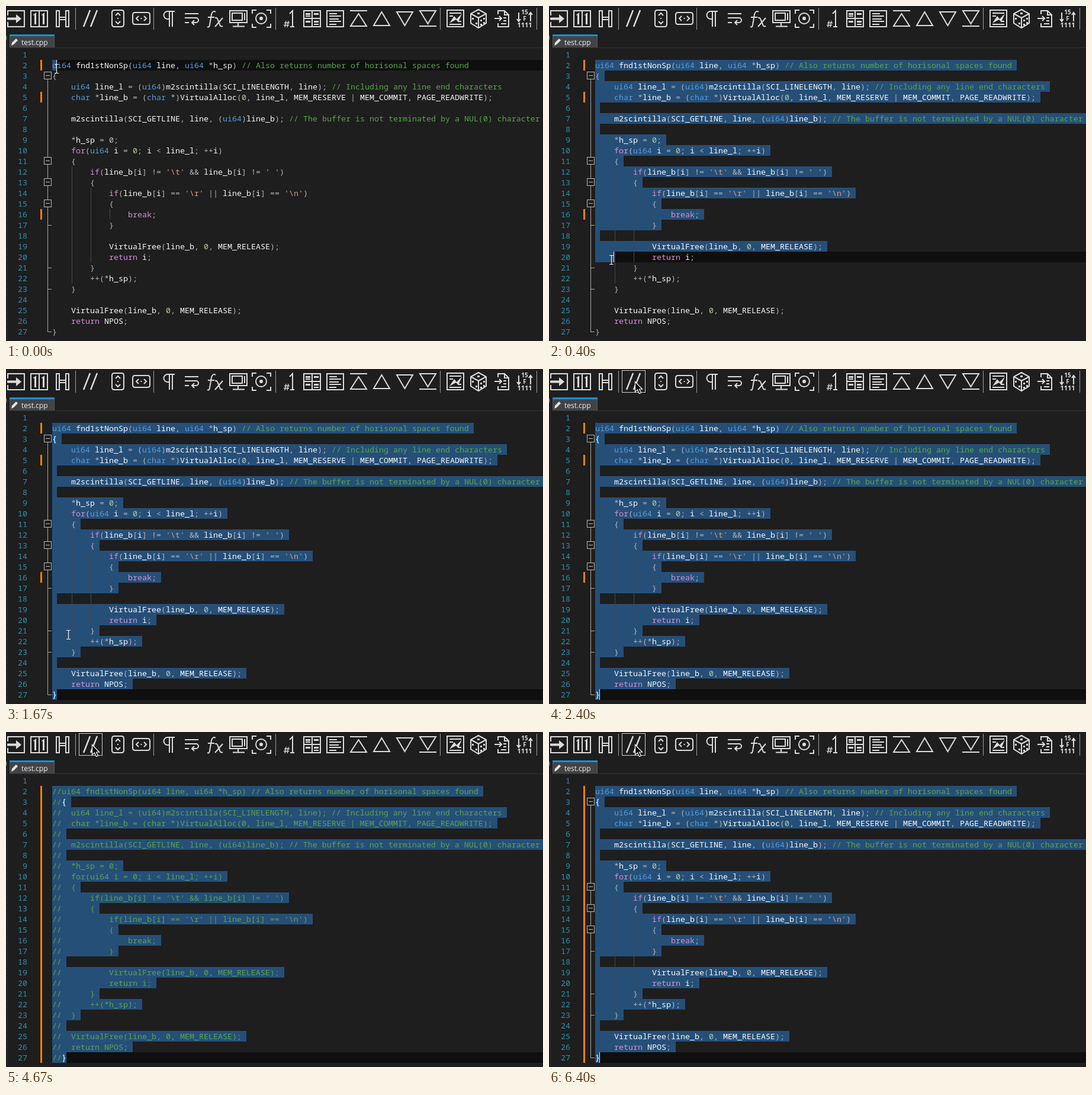
Animation of 907x566 px, one loop 6.67 s. Source, as an HTML page with a canvas:

```html
<!DOCTYPE html>
<html lang="en">
<head>
<meta charset="utf-8">
<title>Toggle comment</title>
<style>
html, body { margin: 0; width: 100%; height: 100%; overflow: hidden; background: #1e1e1e; }
canvas { display: block; }
</style>
</head>
<body>
<canvas id="stage" width="907" height="566"></canvas>
<script>
const ctx = document.getElementById('stage').getContext('2d');
const W = 907, H = 566, LOOP = 6670, STEP = 200 / 3;
const LEFT = 78, CHAR = 8, TOP = 73, ROW = 18;
const MONO = '13.333px "Noto Sans Mono", monospace';
const SANS = '"Open Sans", sans-serif';
const BG = '#1e1e1e', ICON = '#dcdcdc', GREEN = '#57a64a';

const code = String.raw`
ui64 fnd1stNonSp(ui64 line, ui64 *h_sp) // Also returns number of horisonal spaces found
{
    ui64 line_l = (ui64)m2scintilla(SCI_LINELENGTH, line); // Including any line end characters
    char *line_b = (char *)VirtualAlloc(0, line_l, MEM_RESERVE | MEM_COMMIT, PAGE_READWRITE);

    m2scintilla(SCI_GETLINE, line, (ui64)line_b); // The buffer is not terminated by a NUL(0) character

    *h_sp = 0;
    for(ui64 i = 0; i < line_l; ++i)
    {
        if(line_b[i] != '\t' && line_b[i] != ' ')
        {
            if(line_b[i] == '\r' || line_b[i] == '\n')
            {
                break;
            }

            VirtualFree(line_b, 0, MEM_RELEASE);
            return i;
        }
        ++(*h_sp);
    }

    VirtualFree(line_b, 0, MEM_RELEASE);
    return NPOS;
}`.split('\n');
const LAST = code.length;
const commented = code.map((s, i) =>
  i === 0 ? s : '//' + (s.startsWith('    ') ? s.slice(2) : s));

// Syntax colours, first matching rule wins
const rules = [
  [/^\/\/.*/, GREEN],
  [/^'(\\.|.)'/, '#d69d85'],
  [/^(ui64|char)\b/, '#569cd6'],
  [/^(for|if|break|return)\b/, '#d68fd6'],
  [/^\d+/, '#b5cea8'],
  [/^[A-Za-z_]\w*/, '#f8f8f8'],
  [/^[^\w\s'\/]/, '#b4b4b4']
];

function tokenize(s) {
  const out = [];
  for (let i = 0; i < s.length;) {
    const rest = s.slice(i);
    const rule = rules.find(r => r[0].test(rest));
    if (!rule) { i++; continue; }
    const text = rest.match(rule[0])[0];
    out.push({ x: LEFT + i * CHAR, text, color: rule[1] });
    i += text.length;
  }
  return out;
}
const plainTokens = code.map(tokenize);
const commentTokens = commented.map(tokenize);

const rowTop = n => TOP + (n - 1) * ROW;
const rowMid = n => rowTop(n) + ROW / 2;

function box(x, y, w, h, color) {
  ctx.fillStyle = color;
  ctx.fillRect(x, y, w, h);
}
function line(path, color, width = 1) {
  ctx.strokeStyle = color;
  ctx.lineWidth = width;
  ctx.stroke(path);
}
function fill(path, color) {
  ctx.fillStyle = color;
  ctx.fill(path);
}
function label(text, x, y, font, color, align = 'left') {
  ctx.font = font;
  ctx.fillStyle = color;
  ctx.textAlign = align;
  ctx.fillText(text, x, y);
}

const outlines = new Path2D([
  'M3 16V8H31V35H3V27',
  'M42 8H70V35H42Z M56 8V35',
  'M85 8h5v27h-5z M101 8h5v27h-5z M90 19h11 M90 23h11',
  'M183 7h12q4 0 4 4v20q0 4-4 4h-12q-4 0-4-4V11q0-4 4-4z M185 16l4-4 4 4 M185 26l4 4 4-4 M188 21h2',
  'M218 11h21q4 0 4 4v12q0 4-4 4h-21q-4 0-4-4V15q0-4 4-4z M224 17l-4 4 4 4 M233 17l4 4-4 4 M227.500 21h2',
  'M285 9H273a6 6 0 0 0 0 13h3 M276 9V35 M281 9V35',
  'M302 13H325 M302 20H321a4 4 0 0 1 0 8H314 M318 24l-4 4 4 4 M302 28h7',
  'M354 10q-5-3-7 4l-3 18q-1 5-4 3 M341 19h11 M353 20q4-1 5 4l3 7q1 5 5 3 M366 20l-13 15',
  'M378 8H407V28H378Z M382 12H399V24H382Z M403 12V24 M392 28V34 M383 34.500H403',
  'M416 13V7h7 M440 7h7v6 M447 30v6h-7 M423 36h-7v-6 M440 21a9 9 0 1 1-18 0a9 9 0 1 1 18 0',
  'M479 13l5-5V35 M480 35h7',
  'M503 8H531V35H503Z M517 8V35 M503 21h28',
  'M542 8H570V35H542Z M546 13h13 M546 17h20 M546 22h16 M546 26h20 M546 31h12',
  'M581 8H610 M595.500 13L609 34H582Z',
  'M634.500 10L648 33H621Z',
  'M673.500 33L660 10H687Z',
  'M698 34H727 M712.500 30L699 8H726Z',
  'M745 7H773V35H745Z M749 12h20 M749 31h20 M749 17h6 M763 26h6',
  'M798 6l13 7v16l-13 8-13-8V13z M785 13l13 7 13-7 M798 20v17',
  'M831 14V8h11l7 7v20h-18v-6 M842 8v7h7 M825 21h11 M833 17l4 4-4 4 M840 20h5 M840 25h5 M836 30h9',
  'M866 11V25 M863 22l3 4 3-4 M886 26V12 M883 15l3-4 3 4'
].join(' '));
const solids = new Path2D([
  'M2 19.500H17V14L26 21.500L17 29V23.500H2Z',
  'M46 15l5-4v20h-3V15l-2 1z M60 15l5-4v20h-3V15l-2 1z',
  'M434 21a3 3 0 1 1-6 0a3 3 0 1 1 6 0',
  'M506 12h8v3h-8z M520 12h8v3h-8z M506 16h8v2h-8z M506 25h8v3h-8z M520 25h8v3h-8z M520 30h8v2h-8z',
  'M749 29l8-12 4 5 9-9-6 14-4-4z',
  'M796 11h4v3h-4z M787 20h3v3h-3z M793 28h3v3h-3z M801 23h3v3h-3z M806 20h3v3h-3z M801 30h3v3h-3z M806 27h3v3h-3z'
].join(' '));
const slashes = new Path2D('M131 35L142 7 M143 35L154 7');
const hash = new Path2D('M473 25l-2 11 M477 25l-2 11 M470 28.500h9 M469 32.500h9');
const pencil = new Path2D('M9 67l1-5 7-7 3 3-7 7z');
const arrow = new Path2D('M.5 .5V17.500L4.500 14L7.500 20.500L10.500 19L7.500 13H12.500Z');
const separators = [117, 249, 455, 733, 896];

function toolbar(hover, pressed) {
  line(outlines, ICON, 2);
  fill(solids, ICON);
  line(hash, ICON, 1.3);
  label('15', 876, 14, 'bold 10px ' + SANS, ICON, 'center');
  label('F', 876, 25, 'bold 10px ' + SANS, ICON, 'center');
  label('1111', 876, 36, 'bold 11px ' + SANS, ICON, 'center');
  for (const x of separators) box(x, 3, 1, 37, '#a0a0a0');
  if (hover) {
    ctx.strokeStyle = '#d0d0d0';
    ctx.lineWidth = 1;
    ctx.strokeRect(123.5, 2.5, 39, 37);
  }
  ctx.save();
  if (pressed) ctx.translate(1, 0);
  line(slashes, ICON, 2.5);
  ctx.restore();
}

function tabStrip() {
  for (let y = 53; y < H; y += 4) box(2, y, 1, 1, '#505050');
  box(0, 50, 1, 7, '#8a8a8a');
  box(6, 48, 76, 22, '#5a5a5c');
  box(7, 48, 74, 22, '#434346');
  box(6, 48, 76, 3, '#0f93dc');
  box(6, 70, W - 6, 1, '#333336');
  fill(pencil, '#e4e4e4');
  label('test.cpp', 26, 66, '12px ' + SANS, '#f0f0f0');
}

function foldMargin() {
  box(70, rowMid(3), 1, rowMid(LAST) - rowMid(3) + 1, '#a8a8a8');
  for (const n of [17, 21, 23, LAST]) box(70, rowMid(n), 7, 1, '#a8a8a8');
  for (const n of [3, 11, 13, 15]) {
    const y = rowMid(n);
    box(64, y - 6, 13, 12, BG);
    ctx.strokeStyle = '#b8b8b8';
    ctx.lineWidth = 1;
    ctx.strokeRect(64.5, y - 6.5, 12, 12);
    box(67, y - 1, 7, 1, '#b8b8b8');
  }
}

function indentGuides() {
  for (const [x, from, to] of [[111, 12, 22], [143, 14, 20], [175, 16, 16]]) {
    const top = rowTop(from), end = rowTop(to + 1);
    box(x, top, 1, end - top, BG);
    for (let y = top; y < end; y += 2) box(x, y, 1, 1, '#6e6e6e');
  }
}

// Mouse track: time, x, y
const track = [
  [0, 85, 106], [400, 105, 429], [730, 95, 541], [870, 93, 551],
  [1470, 93, 551], [2130, 149, 72], [2200, 149, 38], [2400, 145, 21]
];

function pointerAt(t) {
  const i = track.findIndex(p => p[0] > t);
  if (i < 0) return track[track.length - 1].slice(1);
  const [t0, x0, y0] = track[i - 1], [t1, x1, y1] = track[i];
  let k = (t - t0) / (t1 - t0);
  if (t0 === 1470) k = k * k * (3 - 2 * k);
  return [x0 + (x1 - x0) * k, y0 + (y1 - y0) * k];
}

// Line and column at the end of the drag selection
function selectionEnd(t, x, y) {
  if (t >= 800) return [LAST, 1];
  const n = Math.min(LAST, Math.floor((y - 1 - TOP) / ROW) + 1);
  const s = code[n - 1];
  if (s.startsWith('    ')) return [n, x >= 97 ? 4 : 0];
  return [n, Math.min(s.length, Math.round((x - LEFT) / CHAR))];
}

function caretOn(t) {
  if (t >= 4130) return Math.floor((t - 4130) / 530) % 2 === 0;
  if (t >= 3190) return true;
  return t < 540 || Math.floor((t - 540) / 530) % 2 === 1;
}

function drawPointer(x, y) {
  ctx.save();
  ctx.translate(Math.round(x), Math.round(y));
  if (y > 72) {
    line(new Path2D('M.5 -7V7 M-3 -7.5h3l.5 1 .5-1h3 M-3 7.5h3l.5-1 .5 1h3'), '#f0f0f0', 1.2);
  } else {
    fill(arrow, '#0a0a0a');
    line(arrow, '#ffffff', 1.2);
  }
  ctx.restore();
}

function draw(time) {
  const t = Math.floor((time + 4) / STEP) * STEP;
  const isComment = time >= 4070 && time < 6200;
  const pressed = (time >= 3600 && time < 4070) || (time >= 6070 && time < 6200);
  const [px, py] = pointerAt(t);
  let [endLine, endCol] = selectionEnd(t + 4, px, py);
  if (isComment) endCol = 3;
  const lines = isComment ? commented : code;
  const tokens = isComment ? commentTokens : plainTokens;
  const matched = endLine === LAST;

  box(0, 0, W, H, BG);
  toolbar(px > 122 && px < 163 && py < 41, pressed);
  tabStrip();

  box(LEFT, rowTop(endLine), W - LEFT, ROW, '#0f0f0f');
  for (let n = 2; n <= endLine; n++) {
    const cols = n < endLine ? lines[n - 1].length + 1 : endCol;
    box(LEFT, rowTop(n), cols * CHAR, ROW, '#264f78');
  }

  for (let n = 2; n <= LAST; n++) {
    if (time >= 4070 || n === 2 || n === 5 || n === 16) box(58, rowTop(n), 3, ROW, '#ff8000');
  }
  if (!isComment) {
    foldMargin();
    indentGuides();
  }

  for (let n = 1; n <= LAST; n++) {
    const y = rowMid(n) + 5;
    label(n, 36, y, MONO, '#2b91af', 'right');
    if (matched && (n === 3 || n === LAST)) {
      if (isComment) label('//', LEFT, y, MONO, GREEN);
      label(code[n - 1], LEFT + (endCol - 1) * CHAR, y, 'bold ' + MONO, '#9cdcfe');
    } else {
      for (const k of tokens[n - 1]) label(k.text, k.x, y, MONO, k.color);
    }
  }

  if (caretOn(time)) box(LEFT + endCol * CHAR - 1, rowTop(endLine), 1, ROW, '#f0f0f0');
  drawPointer(px, py);
}

function tick() {
  draw(performance.now() % LOOP);
  requestAnimationFrame(tick);
}
tick();
</script>
</body>
</html>
```
